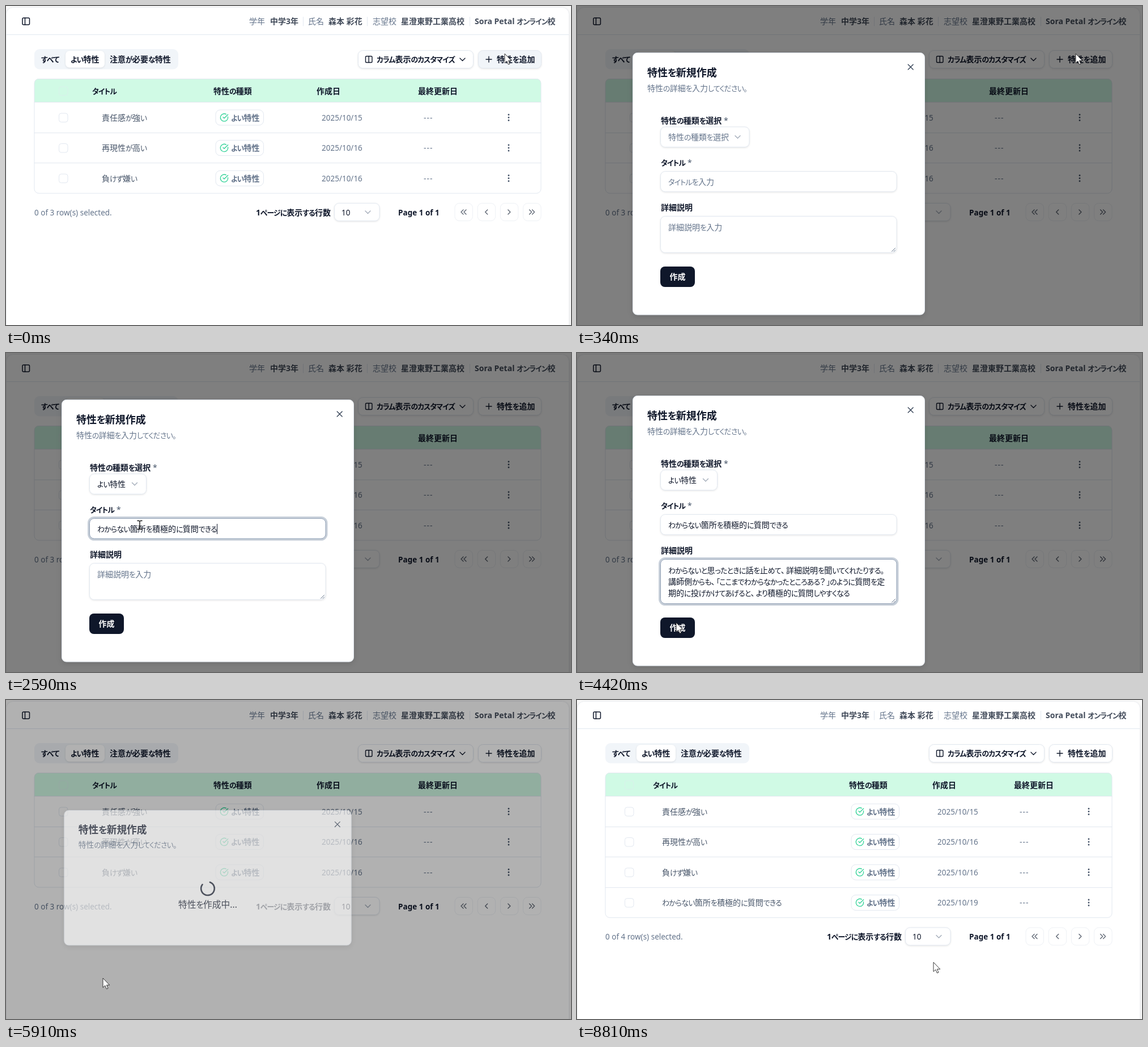
Animation, 997 px wide and 562 px high, one loop 8880 ms. Source, as an HTML page:

```html
<!DOCTYPE html>
<html lang="ja">
<head>
<meta charset="utf-8">
<title>特性の管理</title>
<style>
html, body { margin: 0; width: 100%; height: 100%; overflow: hidden; background: #fafafa; }
svg { display: block; width: 997px; height: 562px; }
text { font: 14px "Noto Sans", "Noto Sans CJK JP", sans-serif; font-feature-settings: "palt"; fill: #0f172a; white-space: pre; }
.kana { font-size: .92em; letter-spacing: -.055em; }
.b .kana { letter-spacing: -.07em; }
.stop { letter-spacing: .15em; }
.dash { letter-spacing: 1px; }
.b { font-weight: 600; }
.latin { font-size: 13.5px; }
.mute { fill: #64748b; }
.soft { fill: #475569; }
.dark { fill: #434c5b; }
.h1 { font-size: 18px; }
.mid { font-size: 16px; text-anchor: middle; }
.inv { fill: #fff; }
.ime { text-decoration: underline; text-decoration-thickness: 1px; }
.toast { font-size: 13px; fill: #008a2e; }
.ln { fill: none; stroke-linecap: round; stroke-linejoin: round; }
.sh { filter: drop-shadow(0 1px 1.5px #0000001a); }
.lift { filter: drop-shadow(0 3px 5px #0000001f); }
</style>
</head>
<body>
<svg id="stage" viewBox="0 0 997 562"></svg>
<script>
const LOOP = 8880, INK = '#0f172a', EDGE = '#e2e8f0', GREY = '#64748b';
const TITLE = 'わからない箇所を積極的に質問できる';
const DETAIL = [
  'わからないと思ったときに話を止めて、詳細説明を聞いてくれたりする。',
  '講師側からも、「ここまでわからなかったところある？」のように質問を定',
  '期的に投げかけてあげると、より積極的に質問しやすくなる'
];
const ROWS = [['責任感が強い', 15], ['再現性が高い', 16], ['負けず嫌い', 16], [TITLE, 19]];
// x of checkbox, title, type, created, updated, menu
const COLS = {
  3: { box: 101, head: [152, 366, 548, 727], cell: [169, 370, 557, 737], menu: 887 },
  4: { box: 92, head: [134, 480, 627, 771], cell: [150, 484, 636, 781], menu: 903 }
};
// time, x, y of the pointer
const PATH = [
  [0, 880, 84], [400, 880, 84], [890, 222, 229], [1040, 222, 229], [1400, 212, 268],
  [1730, 212, 268], [1900, 236, 303], [3000, 236, 303], [3390, 236, 395], [4080, 236, 395],
  [4400, 175, 475], [4430, 175, 475], [4560, 171, 490], [6910, 171, 490], [6980, 189, 442],
  [7340, 206, 412], [7900, 206, 412], [8130, 400, 470], [8560, 400, 470], [8800, 629, 462], [LOOP, 629, 462]
];

const ramp = (t, a, b) => Math.min(1, Math.max(0, (t - a) / (b - a)));
const ease = p => p * p * (3 - 2 * p);

const text = (x, y, s, cls = '', id = '') =>
  `<text x="${x}" y="${y}" class="${cls}" ${id && `id="${id}"`}>` +
  s.replace(/[ぁ-ヶー。「」]+/g, '<tspan class="kana">$&</tspan>')
    .replace(/[、？]/g, '<tspan class="stop">$&</tspan>') + '</text>';
const rect = (x, y, w, h, r = 0, fill = '#fff', stroke = 'none', more = '') =>
  `<rect x="${x}" y="${y}" width="${w}" height="${h}" rx="${r}" fill="${fill}" stroke="${stroke}" ${more}/>`;
const line = (d, color = INK, w = 1.4) => `<path class="ln" d="${d}" stroke="${color}" stroke-width="${w}"/>`;
const group = (attrs, s) => `<g ${attrs}>${s}</g>`;
const field = (x, y, w, h) => rect(x, y, w, h, 8, '#fff', EDGE, 'class="sh"');
const ring = (x, y, w, h, o) => o <= 0 ? '' : group(`opacity="${o}"`,
  rect(x - 2, y - 2, w + 4, h + 4, 10, 'none', '#94a3b8', 'stroke-width="3" stroke-opacity=".5"') +
  rect(x, y, w, h, 8, 'none', '#94a3b8'));
const chevron = (x, y, color) => line(`M${x - 4.5} ${y - 2}l4.5 4.5 4.5-4.5`, color);

function header() {
  let s = rect(0, 0, 997, 562, 0, '#fafafa') +
    rect(.5, 2.5, 993, 580, 12, '#fff', '#eceef1', 'class="sh"') +
    line('M1 50.5H993', EDGE, 1) +
    rect(29, 21, 12.5, 12, 2, 'none', INK, 'stroke-width="1.5"') + line('M33.5 21V33', INK, 1.5);
  for (const x of [524.5, 637.5, 818.5]) s += line(`M${x} 19.5V35`, EDGE, 1);
  return s + text(429, 32, '学年', 'mute') + text(466, 32, '中学3年', 'b dark') +
    text(533, 32, '氏名', 'mute') + text(569, 32, '森本 彩花', 'b dark') +
    text(647, 32, '志望校', 'mute') + text(697, 32, '星澄東野工業高校', 'b dark') +
    text(827, 32, 'Sora Petal オンライン校', 'b dark');
}

function toolbar(hover) {
  return rect(50, 76, 254, 35.5, 9, '#f1f5f9') + rect(105, 79, 69, 29.5, 7, '#fff', 'none', 'class="sh"') +
    text(62, 99, 'すべて', 'b') + text(114, 99, 'よい特性', 'b') + text(183, 99, '注意が必要な特性', 'b') +
    field(621.5, 78.5, 203, 31) + rect(634.5, 88.5, 11.5, 11, 1.5, 'none', INK, 'stroke-width="1.4"') +
    line('M640.2 88.5v11') + text(654, 99, 'カラム表示のカスタマイズ', 'b') + chevron(805.5, 94, INK) +
    rect(833.5, 78.5, 111, 31, 8, hover ? '#f1f5f9' : '#fff', EDGE, 'class="sh"') +
    line('M847 94h10M852 89v10') + text(866, 99, '特性を追加', 'b');
}

function badge(x, y) {
  return rect(x, y - 13.5, 84.5, 27, 8, '#fff', EDGE) +
    group(`transform="translate(${x + 7} ${y - 8}) scale(.667)"`,
      line('M21.8 10A10 10 0 1 1 17 3.3M9 11l3 3L22 4', '#34d399', 2)) +
    text(x + 27, y + 5, 'よい特性', 'b mute');
}

function table(n) {
  const c = COLS[n], bottom = 169.5 + n * 53.5;
  const box = y => rect(c.box - 7.5, y - 7.5, 15.5, 15.5, 4, 'none', EDGE);
  let s = `<path d="M50 169.5V136a8 8 0 0 1 8-8H936a8 8 0 0 1 8 8V169.5Z" fill="#d0fae5"/>` +
    group('opacity=".5"', box(149.5));
  ['タイトル', '特性の種類', '作成日', '最終更新日'].forEach((h, i) => s += text(c.head[i], 154.5, h, 'b'));
  ROWS.slice(0, n).forEach(([title, day], i) => {
    const y = 196.5 + i * 53.5, [a, b, d, e] = c.cell;
    s += line(`M50 ${Math.floor(y - 27) + .5}H944`, EDGE, 1) + box(y) + text(a, y + 5, title, 'soft') + badge(b, y) +
      text(d, y + 5, '2025/10/' + day, 'latin mute') + text(e, y + 5, '---', 'mute dash');
    for (const k of [-5, 0, 5]) s += `<circle cx="${c.menu}" cy="${y + k}" r="1.4" fill="#475569"/>`;
  });
  return s + rect(50, 128.5, 894, bottom - 128.5, 8, 'none', EDGE) + footer(n, bottom + 33.5);
}

function footer(n, y) {
  let s = text(50, y + 5, `0 of ${n} row(s) selected.`, 'latin mute') +
    text(441, y + 5, '1ページに表示する行数', 'b') + field(579.5, y - 16, 79.5, 31) +
    text(592, y + 5, '10', 'latin') + chevron(638.5, y - .5, '#a3acb9') + text(692, y + 5, 'Page 1 of 1', 'latin b');
  const left = 'l-4 4 4 4', right = 'l4 4-4 4';
  const icons = [`M-.5-4${left}M4.5-4${left}`, `M2-4${left}`, `M-2-4${right}`, `M-4.5-4${right}M.5-4${right}`];
  icons.forEach((d, i) => s += rect(792 + i * 40.2, y - 16, 31.5, 31, 8, '#fff', '#eef1f5') +
    group(`transform="translate(${807.5 + i * 40.2} ${y - .5})"`, line(d, '#5f6774')));
  return s;
}

// Dialog frame with heading and close icon
function frame(top, h) {
  return rect(98.5, top, 515, h, 8, '#fff', EDGE, 'class="lift"') +
    text(124, top + 41.5, '特性を新規作成', 'h1 b') + text(124, top + 67, '特性の詳細を入力してください。', 'mute') +
    line(`M584.2 ${top + 20.5}l9 9m0-9l-9 9`, '#334155', 1.3);
}

function form(t) {
  const grow = t >= 3930 ? 7 : 0, picked = t >= 1730, selW = picked ? 100 : 156.5, areaH = 64 + 2 * grow;
  const typed = TITLE.slice(0, Math.round(17 * ramp(t, 1980, 2450)));
  const focus1 = ramp(t, 1900, 2000) - ramp(t, 3590, 3720), focus2 = ramp(t, 3590, 3720);
  const star = (x, y) => text(x, y, '*', 'soft');
  let s = frame(82.5, 461.5 + 2 * grow) +
    text(148, 206.5, '特性の種類を選択', 'b') + star(259, 206.5) + field(147.5, 213, selW, 35.5) +
    text(161, 236, picked ? 'よい特性' : '特性の種類を選択', picked ? '' : 'mute') +
    chevron(picked ? 227 : 283.5, 230.5, '#a3acb9') +
    text(148, 281, 'タイトル', 'b') + star(195, 281) + field(147.5, 291.5, 416.5, 35.5) + ring(147.5, 291.5, 416.5, 35.5, focus1) +
    (typed ? '' : text(161, 315, 'タイトルを入力', 'mute')) +
    text(161, 315, typed, t < 2590 ? 'ime' : '', t < 3590 ? 'end' : '') +
    text(148, 360, '詳細説明', 'b') + field(147.5, 370.5, 416.5, areaH) + ring(147.5, 370.5, 416.5, areaH, focus2) +
    line(`M555.5 ${368.5 + areaH}l6-6m-2.5 6l2.5-2.5`, GREY, 1) +
    rect(147, 459 + 2 * grow, 61, 36, 8, INK) + text(163.5, 482 + 2 * grow, '作成', 'b inv');
  if (grow) DETAIL.forEach((d, i) => s += text(161, 394.5 + i * 20.2, d, '', i == 2 ? 'end' : ''));
  else s += text(161, 394.5, '詳細説明を入力', 'mute') + (t >= 3590 ? text(161, 394.5, '', '', 'end') : '');
  const blink = t >= 1940 && t < 2850 || t >= 3250 && t < 4350;
  if (blink) s += rect(161, 0, 1, 18, 0, INK, 'none', 'id="caret"');
  if (t >= 960 && t < 1730) s += dropdown(t);
  return group(`transform="translate(0 ${-grow})"`, s);
}

function dropdown(t) {
  return group(`opacity="${ramp(t, 930, 1080)}"`,
    rect(147.5, 252.5, 156.5, 74, 8, '#fff', EDGE, 'class="sh"') +
    rect(152.5, 257.5, 146.5, 32, 6, t > 1250 ? '#f1f5f9' : '#fff') +
    text(161, 278.5, 'よい特性') + text(161, 310.5, '注意が必要な特性'));
}

function loading(t) {
  return frame(192.5, 241.5) +
    group(`transform="translate(356 332.5) rotate(${242 + (t - 5780) * .36}) scale(1.333) translate(-12 -12)"`,
      line('M21 12a9 9 0 1 1-6.219-8.56', INK, 2)) +
    text(356, 367, '特性を作成中...', 'mid');
}

function dialog(t) {
  const o = ramp(t, 50, 290) - ramp(t, 5830, 6040);
  if (o <= 0) return '';
  const z = .95 + .05 * ease(o);
  return rect(0, 0, 997, 562, 0, '#000', 'none', `opacity="${o / 2}"`) +
    group(`opacity="${o}" transform="translate(356 313) scale(${z}) translate(-356 -313)"`, t < 4900 ? form(t) : loading(t));
}

function toast(t) {
  const o = ease(ramp(t, 5900, 6260)) - ease(ramp(t, 8580, 8800));
  if (o <= 0) return '';
  return group(`opacity="${o}" transform="translate(0 ${-60 * (1 - o)})"`,
    rect(618.5, 20, 358, 53, 8, '#ecfdf3', '#bffcd9', 'class="lift"') +
    `<circle cx="641" cy="46.5" r="8" fill="#008a2e"/>` + line('M637.5 46.7l2.5 2.5 4.5-5', '#ecfdf3', 1.6) +
    text(658, 51.5, '特性を作成しました', 'toast b'));
}

function pointer(t) {
  const i = PATH.findIndex(k => k[0] > t), [a, x0, y0] = PATH[i - 1], [b, x1, y1] = PATH[i];
  const p = ease(ramp(t, a, b)), x = x0 + (x1 - x0) * p, y = y0 + (y1 - y0) * p;
  const beam = t >= 1840 && t < 4180;
  return group(`transform="translate(${x} ${y})"`, beam
    ? line('M-4-7.5h2.5l1.5 1 1.5-1h2.5M-4 7.5h2.5l1.5-1 1.5 1h2.5M0-6.5V6.5', '#111', 1.4)
    : `<path d="M0 0V16.5L3.8 13 6.4 19 9 18 6.5 12.2H11.7Z" fill="#fff" stroke="#222" stroke-width=".9"/>`);
}

const stage = document.getElementById('stage');
function draw() {
  const t = performance.now() % LOOP;
  stage.innerHTML = header() + toolbar(t < 100) + table(t < 6000 ? 3 : 4) + dialog(t) + toast(t) + pointer(t);
  const caret = document.getElementById('caret'), end = document.getElementById('end');
  if (caret && end) {
    caret.setAttribute('x', 161 + end.getComputedTextLength());
    caret.setAttribute('y', end.getAttribute('y') - 14);
  }
  requestAnimationFrame(draw);
}
draw();
</script>
</body>
</html>
```
